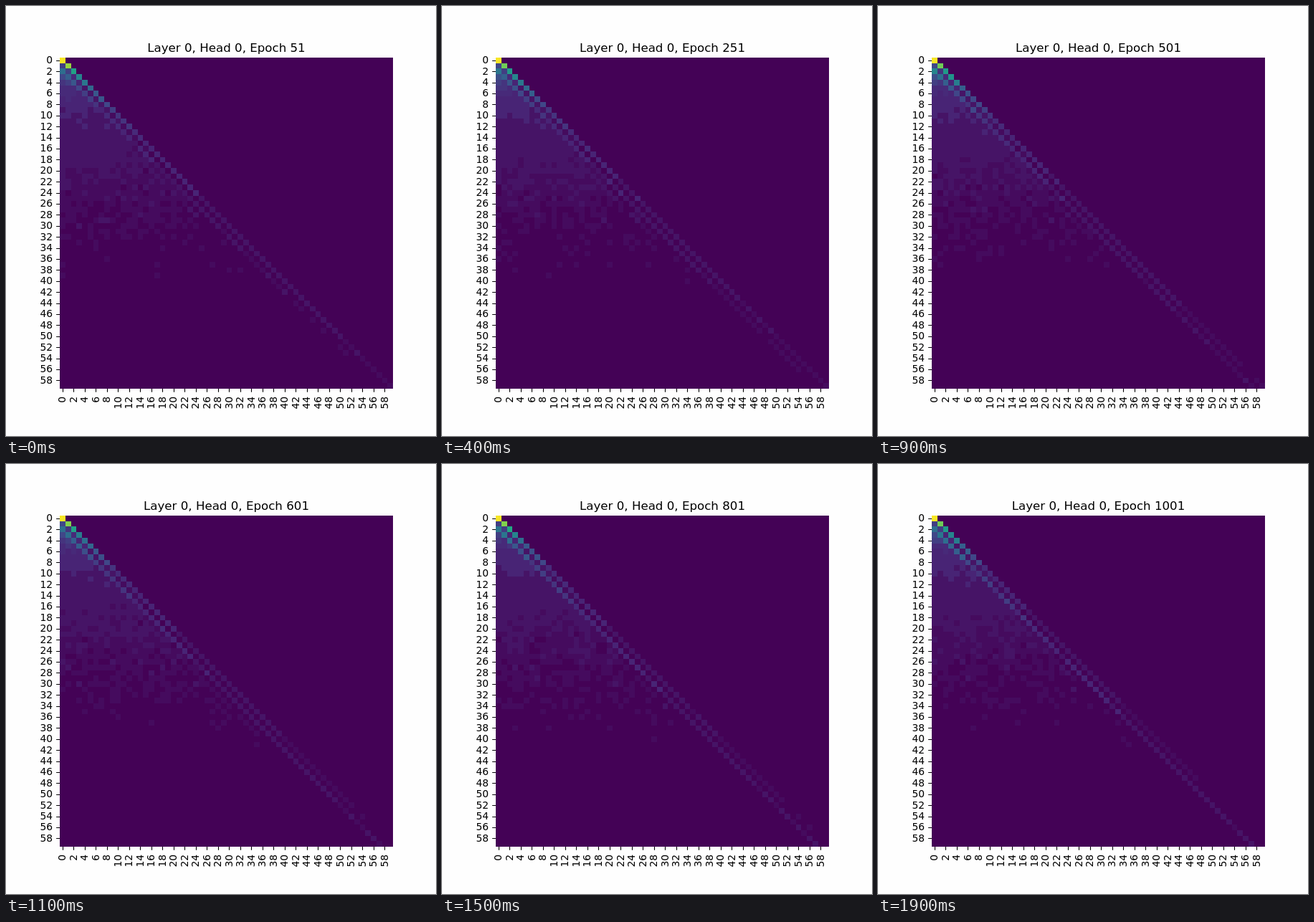
An HTML page that plays this animation: 600x600 px, repeating every 2 s.

```html
<!DOCTYPE html>
<html lang="en">
<head>
<meta charset="utf-8">
<title>Attention heatmap</title>
<style>
  html, body { margin: 0; width: 100%; height: 100%; overflow: hidden; background: #fefefe; }
  svg { display: block; width: 100vw; height: 100vh; }
  text { font: 13.89px "DejaVu Sans", sans-serif; fill: #000; }
  #title { font-size: 16.67px; text-anchor: middle; }
  .label { text-anchor: end; }
  .tick { stroke: #000; stroke-width: 1.11; }
</style>
</head>
<body>
<svg id="stage" viewBox="0 0 600 600">
  <text id="title" x="307.5" y="64"></text>
  <rect x="75" y="72" width="465" height="462" fill="#440256" shape-rendering="crispEdges"/>
  <g id="cells" shape-rendering="crispEdges"></g>
  <g id="axes"></g>
</svg>
<script>
const N = 60, LEFT = 75, TOP = 72, CW = 7.75, CH = 7.7, BOTTOM = TOP + N * CH;
const STEP = 100, STEPS = 20;
const VIRIDIS = ["440256", "482475", "414487", "355f8d", "2a788e", "21918c",
  "22a884", "44bf70", "7ad151", "bddf26", "fde725"]
  .map(h => [0, 2, 4].map(k => parseInt(h.slice(k, k + 2), 16)));

const byId = id => document.getElementById(id);

function add(parent, tag, attrs, text) {
  const el = document.createElementNS("http://www.w3.org/2000/svg", tag);
  for (const key in attrs) el.setAttribute(key, attrs[key]);
  if (text !== undefined) el.textContent = text;
  parent.appendChild(el);
  return el;
}

function randomFrom(seed) {
  return () => {
    seed = (seed + 0x6d2b79f5) | 0;
    let t = Math.imul(seed ^ (seed >>> 15), 1 | seed);
    t = (t + Math.imul(t ^ (t >>> 7), 61 | t)) ^ t;
    return ((t ^ (t >>> 14)) >>> 0) / 4294967296;
  };
}

// Coarse bands at the dark end, finer steps above.
function band(v) {
  if (v < 0.0205) return 0;
  if (v < 0.03) return 0.027;
  if (v < 0.065) return 0.052;
  return Math.min(1, Math.max(0.1, Math.round(v / 0.03) * 0.03));
}

function color(v) {
  const x = band(v) * (VIRIDIS.length - 1);
  const k = Math.min(VIRIDIS.length - 2, Math.floor(x));
  const rgb = VIRIDIS[k].map((c, n) => Math.round(c + (VIRIDIS[k + 1][n] - c) * (x - k)));
  return `rgb(${rgb})`;
}

// Weight of column j in row i; p is training progress, n is normal noise.
function weight(i, j, p, n) {
  if (i === 0) return 1;
  const d = i - j;
  const peak = 1 / (1 + 0.28 * i ** 1.2);
  if (d === 0) {
    if (i === 1) return 0.8 + 0.025 * n;
    return 0.92 * peak * (i > 8 ? 1 - 0.35 * p : 1) * (1 + 0.07 * n);
  }
  if (d === 2) {
    const early = 0.62, late = 1.35 * i / (i + 2);
    return peak * (early + (late - early) * p) * (1 + (i < 8 ? 0.05 : 0.14) * n);
  }
  const base = 0.65 / i / (1 + (i / 45) ** 5);
  if (d === 1) return Math.min(0.2, base * 0.5) * (1 + 0.08 * n);
  const parity = (d % 2 ? -1 : 1) * Math.exp(-d / 5) * 0.015 * i;
  return base * (1 + parity) * (1 + (0.06 + 0.00022 * i * i) * n);
}

const cells = [];
for (let i = 0; i < N; i++) {
  for (let j = 0; j <= i; j++) {
    const x = Math.round(LEFT + j * CW), y = Math.round(TOP + i * CH);
    const el = add(byId("cells"), "rect", {
      x, y,
      width: Math.round(LEFT + (j + 1) * CW) - x,
      height: Math.round(TOP + (i + 1) * CH) - y
    });
    cells.push({ i, j, el });
  }
}

const axes = byId("axes");
const baseline = center => Math.round(center + 4.35);
for (let k = 0; k < N; k += 2) {
  const x = LEFT + (k + 0.5) * CW, y = TOP + (k + 0.5) * CH;
  const tx = Math.round(x) + 0.5, ty = Math.round(y) + 0.5;
  add(axes, "path", { class: "tick", d: `M${LEFT} ${ty}h-4.86M${tx} ${BOTTOM}v4.86` });
  add(axes, "text", { class: "label", x: 65.2, y: baseline(y) }, k);
  add(axes, "text", {
    class: "label", transform: `translate(${baseline(x)} 544.9) rotate(-90)`
  }, k);
}

function draw(step) {
  const random = randomFrom(977 * step + 51);
  const normal = () => (random() + random() + random() + random() - 2) * 1.73;
  const p = step / (STEPS - 1);
  byId("title").textContent = `Layer 0, Head 0, Epoch ${51 + 50 * step}`;
  for (const { i, j, el } of cells) el.setAttribute("fill", color(weight(i, j, p, normal())));
}

const start = performance.now();
let shown = -1;
function tick() {
  const step = Math.floor((performance.now() - start) / STEP) % STEPS;
  if (step !== shown) draw(shown = step);
  requestAnimationFrame(tick);
}
tick();
</script>
</body>
</html>
```
